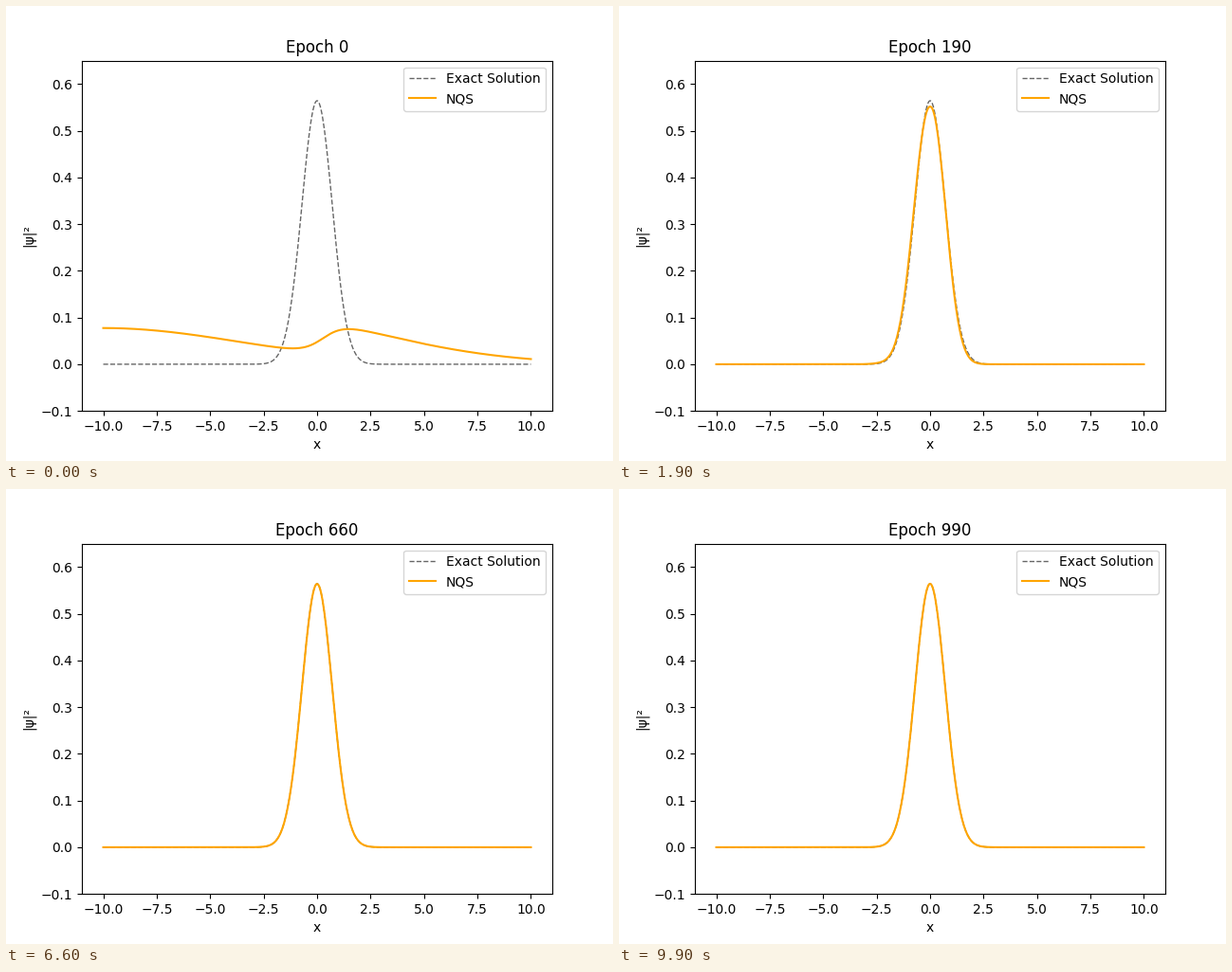
A matplotlib script for the animation above (10000 ms loop, 640 px wide and 480 px high).

```python
import matplotlib.pyplot as plt
import numpy as np
from matplotlib.animation import FuncAnimation

FRAMES = 100
EPOCH_STEP = 10
WARMUP = 50   # epochs until the density has collapsed into one peak
SWING = 140   # epochs for the skew to swing to the other side

x = np.linspace(-10, 10, 500)
exact = np.exp(-x**2) / np.sqrt(np.pi)


def normalise(density):
    return density / (density.sum() * (x[1] - x[0]))


def initial():
    """Broad slope on the left, lifted by a smooth step at zero."""
    step = (1.39 + 0.139 * x) / (1 + np.exp(-2.1 * x))
    return 0.0775 * np.exp(step - ((x + 10) / 9.2)**2)


def peak(residual, skew):
    """Flattened, lopsided bell that tends to the exact one."""
    left = x < 0
    width = 1 + 0.12 * residual + np.where(left, -0.077, 0.077) * skew
    power = 2 + np.where(left, 0.43, 0.7) * residual
    bell = 0.5 * np.exp(-(np.abs(x) / width)**power)
    tail = 0.003 * np.sqrt(residual) * np.exp(-3 * (x + 2.3)**2)
    return normalise(bell + tail)


start = initial()


def density_at(epoch):
    if epoch < WARMUP:
        t = epoch / WARMUP
        w = t * t * (3 - 2 * t)
        return start**(1 - w) * peak(1, 1)**w if w == 0 else normalise(
            start**(1 - w) * peak(1, 1)**w)
    t = (epoch - WARMUP) / SWING
    residual = np.exp(-1.705 * t**0.8)
    return peak(residual, residual**0.65 * np.cos(np.pi * t))


fig, ax = plt.subplots(figsize=(6.4, 4.8), dpi=100)
ax.plot(x, exact, "k--", lw=1, alpha=0.6, label="Exact Solution")
line, = ax.plot(x, start, color="orange", label="NQS")
ax.set_xlim(-11, 11)
ax.set_ylim(-0.1, 0.65)
ax.set_xlabel("x")
ax.set_ylabel("|ψ|²")
ax.legend(loc="upper right")
title = ax.set_title("Epoch 0")


def update(frame):
    epoch = frame * EPOCH_STEP
    line.set_ydata(density_at(epoch))
    title.set_text(f"Epoch {epoch}")
    return line, title


anim = FuncAnimation(fig, update, frames=FRAMES, interval=100, repeat=True,
                     repeat_delay=0)
plt.show()
```
